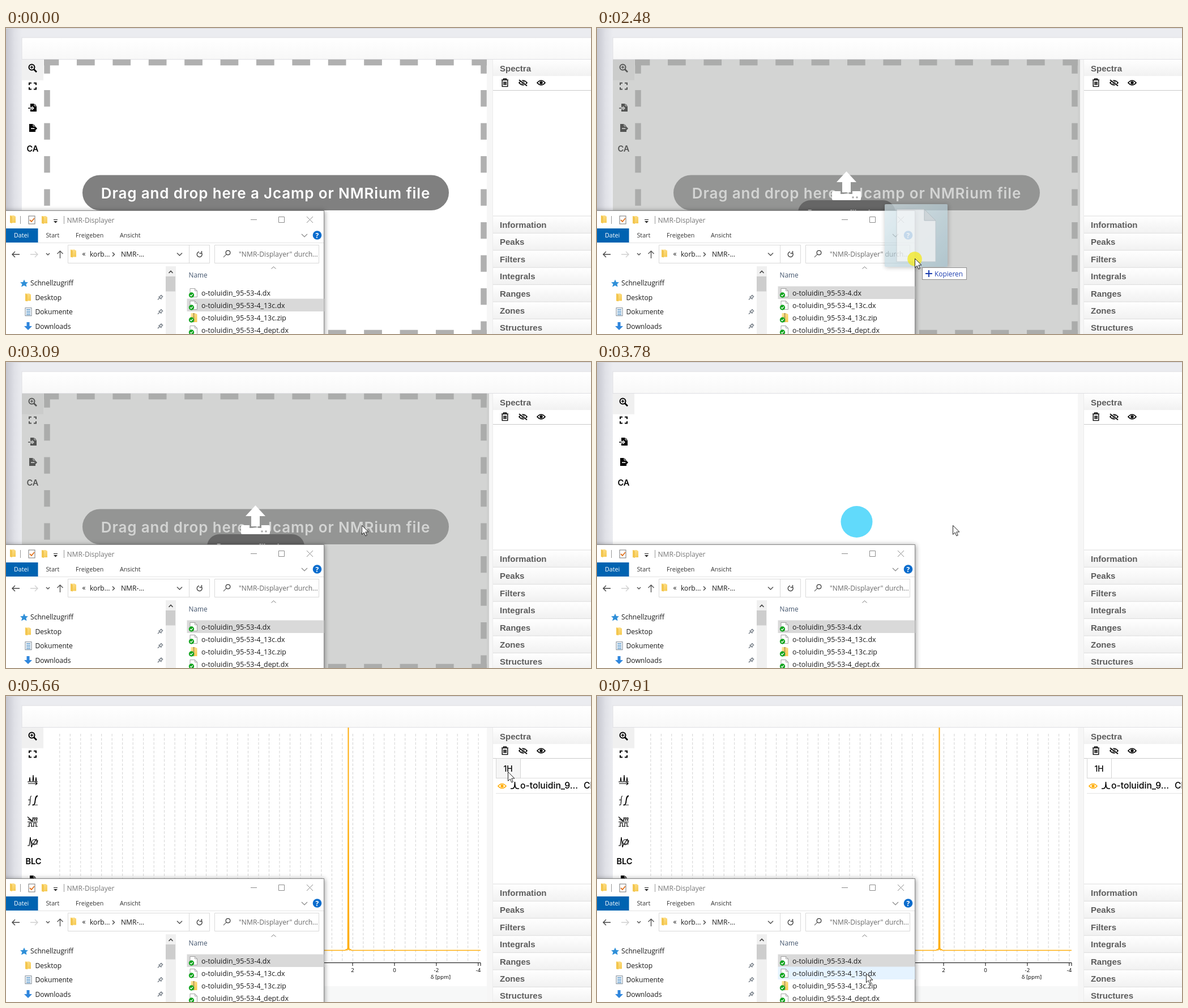
Animation of 1033 by 542 pixels, one loop 8000 ms. Source, as an HTML page:

```html
<!DOCTYPE html>
<html lang="de">
<head>
<meta charset="utf-8">
<title>Drag and drop</title>
<style>
html, body { margin: 0; width: 100%; height: 100%; overflow: hidden; background: #ebecf0; }
svg { display: block; width: 100%; height: 100%; }
.ui { font: 12.1px "Open Sans", "Noto Sans", sans-serif; }
.app { font: 600 14.6px Inter, sans-serif; }
.head { font: bold 15px "Liberation Sans", Arial, sans-serif; fill: #5c5c5c; }
.line { fill: none; stroke: currentColor; }
</style>
</head>
<body>
<svg id="stage" viewBox="0 0 1033 542" xmlns="http://www.w3.org/2000/svg"></svg>
<script>
const LOOP = 8000;
const stage = document.getElementById('stage');

const rect = (x, y, w, h, fill, extra = '') =>
  `<rect x="${x}" y="${y}" width="${w}" height="${h}" fill="${fill}" ${extra}/>`;
const text = (x, y, str, extra = '') => `<text x="${x}" y="${y}" ${extra}>${str}</text>`;
const line = (d, color, width = 1, extra = '') =>
  `<path d="${d}" fill="none" stroke="${color}" stroke-width="${width}" ${extra}/>`;
const fill = (d, color, extra = '') => `<path d="${d}" fill="${color}" ${extra}/>`;
const at = (x, y, body) => `<g transform="translate(${x} ${y})">${body}</g>`;
const group = (id, body, extra = '') => `<g id="${id}" ${extra}>${body}</g>`;
const range = (n, f) => Array.from({ length: n }, (_, i) => f(i)).join('');

const defs = `<defs>
  <linearGradient id="edge"><stop offset="0" stop-color="#c6c7cf"/><stop offset=".55" stop-color="#e0e1e7"/><stop offset="1" stop-color="#ebecf0"/></linearGradient>
  <linearGradient id="bar" x2="0" y2="1"><stop offset="0" stop-color="#fff"/><stop offset="1" stop-color="#f1f1f1"/></linearGradient>
  <linearGradient id="header" x2="0" y2="1"><stop offset="0" stop-color="#fff"/><stop offset="1" stop-color="#f8f8f8"/></linearGradient>
  <linearGradient id="glass" x2="1" y2="1"><stop offset="0" stop-color="#d5e6ec"/><stop offset="1" stop-color="#9dbdca"/></linearGradient>
  <linearGradient id="folder" x2="1" y2="1"><stop offset="0" stop-color="#ffe59b"/><stop offset="1" stop-color="#f5c84c"/></linearGradient>
  <filter id="shadow" x="-10%" y="-10%" width="120%" height="120%"><feDropShadow dx="1" dy="1" stdDeviation="4" flood-opacity=".4"/></filter>
  <clipPath id="plotClip"><rect x="67" y="56" width="782" height="458"/></clipPath>
</defs>`;

// Web application
const eye = (color, slashed) =>
  line('M-7 0Q0 -8 7 0Q0 8 -7 0Z', color, 1.7) + `<circle r="2.7" fill="${color}"/>` +
  (slashed ? line('M-7 -6L7 6', '#fff', 3.5) + line('M-7 -5L7 5.5', color, 1.6) : '');

const trash = line('M-6 -5H6M-2.5 -5V-7H2.5V-5M-4.8 -4V6.6H4.8V-4M-2 -2V4M0 -2V4M2 -2V4', '#000', 1.4);

const zoomIcon = at(46, 70, `<circle r="5" cx="-.5" cy="-.5" class="line" stroke="#000" stroke-width="2"/>` +
  line('M3 3L8 8', '#000', 2.6) + line('M-3 -.5H2M-.5 -3V2', '#000', 1.4));
const expandIcon = at(47, 103, line('M-6 -2V-5.5H-2M2 -5.5H6V-2M6 2V5.5H2M-2 5.5H-6V2', '#000', 2));
const page = fill('M-4 -7H3L7 -3V7H-4Z', '#000') + line('M3 -7V-3H7', '#fff', .9);
const importIcon = at(47, 141, page + line('M-8 1H0', '#fff', 4) + line('M-8 1H2M-1 -2L2 1L-1 4', '#000', 1.5) +
  line('M-4 1H2M-1 -2L2 1L-1 4', '#fff', 1.2));
const exportIcon = at(45, 177, page + line('M-1 1H7', '#fff', 1.6) + line('M5 1H9M6 -2L9 1L6 4', '#000', 1.6));

const accordion = ['Information', 'Peaks', 'Filters', 'Integrals', 'Ranges', 'Zones', 'Structures'];
const frame =
  rect(0, 0, 1033, 542, '#ebecf0') + rect(0, 0, 28, 542, 'url(#edge)') + rect(0, 0, 1033, 1, '#d3d4da') +
  rect(28, 17, 1010, 38.5, 'url(#header)', 'stroke="#dfdfe3"') +
  rect(28, 56, 821, 486, '#fff') + rect(849, 56, 10, 486, '#f6f6f6') +
  rect(859, 56, 174, 486, '#fff') + line('M859.5 56V542', '#ececec') +
  rect(860, 56, 173, 29, 'url(#bar)') + text(872, 76.5, 'Spectra', 'class="head"') +
  at(881, 97, trash) + at(913, 97, eye('#000', true)) + at(945, 97, eye('#000')) +
  line('M860 110.5H1033', '#c9c9c9') +
  accordion.map((name, i) => {
    const y = 333 + i * 30.4;
    return rect(860, y, 173, 30.4, 'url(#bar)') + line(`M860 ${y}H1033`, '#dcdcdc') +
      text(872, y + 21, name, 'class="head"');
  }).join('') +
  rect(28, 56, 38, 36.5, '#f0f0f0') + zoomIcon + expandIcon;

const loadTools = group('loadTools', importIcon + exportIcon +
  text(47, 218.5, 'CA', 'class="app" text-anchor="middle"'));

const dropZone = group('dropZone',
  ['M67 61H849', 'M67 540H849'].map(d =>
    line(d, '#b0b0b0', 10.5, 'stroke-dasharray="31.7" stroke-dashoffset="5.4"')).join('') +
  ['M72.5 56V545', 'M843.5 56V545'].map(d =>
    line(d, '#b0b0b0', 10.5, 'stroke-dasharray="29.25" stroke-dashoffset="4.5"')).join('') +
  rect(135, 260.5, 647, 62.5, '#808080', 'rx="31.2"') +
  text(458.5, 301.5, 'Drag and drop here a Jcamp or NMRium file',
    'class="app" fill="#fff" text-anchor="middle" style="font-size:26px;letter-spacing:.033em"'));

const overlay = group('overlay',
  rect(28, 56, 825, 486, '#a7a9a8', 'opacity=".5"') +
  rect(355, 305, 172, 44, '#666', 'rx="22"') +
  text(441, 333, 'Drop your files here', 'class="app" fill="#fff" text-anchor="middle"') +
  fill('M440.5 254L458 273H448V291H433V273H423Z', '#fff') +
  fill('M417 289H430V294H451V289H464Q466 289 466 291V303Q466 305 464 305H417Q415 305 415 303V291Q415 289 417 289Z', '#fff') +
  '<circle cx="452" cy="300" r="1.8" fill="#aaa"/><circle cx="459" cy="300" r="1.8" fill="#aaa"/>');

const loader = group('loader', '<circle cx="458.5" cy="283" r="28" fill="#61dafb"/>');

// Spectrum
const PPM = 36.97, ZERO = 686;
const sheet = group('sheet', rect(28, 514, 821, 28, '#f7f8f8') + line('M94 472.5H838V478', '#000') +
  text(767.5, 501, 'δ [ppm]', 'class="ui" style="font-size:9.7px" text-anchor="middle"'));

const tools =
  at(47, 149, line('M-9 3H-6L-5 -5L-4 3H0L1 -9L2 3H5L6 -5L7 3H9M-8 6H8M5 3.5L8 6L5 8.5', '#000', 1.2)) +
  at(47, 185, line('M-8 8H-6C-3 8 -6 -8 -2 -8M-8 -1H-4', '#000', 1.2) +
    line('M0 8C7 9 2 -8 9 -8', '#000', 1.8) + line('M-1 8H9', '#000', .8)) +
  at(47, 222, line('M-9 -8L-1 -1M-8 -4L0 0M-9 1H9M-6 9V3H-2V9M2 9V3H6V9M-9 9H-5M-3 9H3M5 9H9', '#000', 1.2) +
    text(-1, -1, 'm', 'font-family="Liberation Serif, serif" font-size="13" font-style="italic" font-weight="bold"')) +
  at(47, 259, line('M-9 6H-6L-4 -9L-2 9L0 3H9M1 3L7 -6', '#000', 1.2) +
    '<circle cx="3" cy="0" r="4.5" class="line" stroke="#000" stroke-width="1.2"/>' + line('M5 -5L9 -3L8 1', '#000', 1.2)) +
  text(48.5, 298, 'BLC', 'class="app" text-anchor="middle"') + at(46, 325, page);

const wobble = 'M95 450.5H599L600.5 449L602 450L603.5 446L604.5 220L605.5 446L607 450L608.5 449L610 450.5H681L682 449.7L683 450.5H838';
const spectrum = group('spectrum',
  range(41, i => line(`M${(94.8 + i * PPM / 2).toFixed(1)} 67V471`, '#d2d2d2', 1, 'stroke-dasharray="4.5 3"')) +
  [2, 0, -2, -4].map(v => line(`M${ZERO - v * PPM} 472V478`, '#000') +
    text(ZERO - v * PPM, 488.5, v, 'class="ui" style="font-size:9.7px" text-anchor="middle"')).join('') +
  line(wobble, '#ffae0d', 1.7) + line('M604.5 56V450', '#ffae0d', 2) +
  tools +
  '<rect id="tab" x="865.5" y="110.5" width="43" height="35" stroke="#d4d4d4"/>' +
  line('M909 145.5H1033', '#dedede') +
  text(886.5, 134, '1H', 'class="app" text-anchor="middle" style="font-size:14px;font-weight:500"') +
  at(876, 159.5, eye('#ffae0d')) +
  line('M891 164H894C898 164 898 160 898.5 152C899 160 899 164 903 164H906', '#000', 1.5) +
  text(908, 163.5, 'o-toluidin_9...', 'class="app" style="font-size:15.7px;font-weight:500"') +
  text(1020, 163.5, 'Cl', 'class="app" style="font-size:15.7px;font-weight:500"') +
  line('M865 172.5H1033', '#e4e4e4'));

const crosshair = group('crosshair',
  line('M67 0H849', '#222', 1, 'id="crossH"') + line('M0 56V514', '#222', 1, 'id="crossV"') +
  '<text id="ppm" class="app" style="font-size:15px;font-weight:500"></text>', 'clip-path="url(#plotClip)"');

// File explorer
const ROW_TOP = 458, ROW_H = 22;
const folder = fill('M-5 -7H2L5 -5V6H-5Z', 'url(#folder)') + fill('M-5 -7L-1 -5V7L-5 6Z', '#f3c64f');
const check = '<circle cx="-3" cy="4" r="4.7" fill="#12a41f"/>' + line('M-5.3 4L-3.6 5.8L-.6 2.4', '#fff', 1.3);
const docIcon = fill('M-5.5 -7.5H3L7 -3.5V7.5H-5.5Z', '#fff', 'stroke="#8d8d8d" stroke-width=".8"') +
  line('M3 -7.5V-3.5H7', '#8d8d8d', .8);
const zipIcon = fill('M-4 -8H3L7 -6V8H-4Z', 'url(#folder)') + line('M1 -8V8', '#8a7442', 2, 'stroke-dasharray="1.5 1"');
const pin = line('M-4 4L-1 1M-2.5 -1.5L2.5 3M-1.5 -.5L2 -4L4.5 -1.5L1 2', '#808890', 1.6);

const files = ['o-toluidin_95-53-4.dx', 'o-toluidin_95-53-4_13c.dx', 'o-toluidin_95-53-4_13c.zip', 'o-toluidin_95-53-4_dept.dx'];
const fileRow = (name, i) => {
  const y = ROW_TOP + i * ROW_H;
  return rect(319.5, y - .5, 242, ROW_H + .5, 'none', `id="row${i}"`) +
    at(330.5, y + 11, (name.endsWith('zip') ? zipIcon : docIcon) + check) +
    text(345, y + 16, name, 'style="font-size:12.4px"');
};

const star = fill('M0 -6.5L2 -2L7 -1.5L3.5 1.5L4.5 6.5L0 4L-5 6.5L-3.5 1.5L-7 -1.5L-2 -2Z', '#2f8fd8');
const places = [
  ['Desktop', folder],
  ['Dokumente', rect(-5, -7, 11, 14, '#fff', 'stroke="#7b8794"') + line('M-3 -4H4M-3 -1H4M-3 2H4M-3 5H4', '#3c84c0', 1.3)],
  ['Downloads', fill('M-2.5 -7H2.5V0H7L0 7L-7 0H-2.5Z', '#2f86dd')]
];

const explorer = `<g class="ui" fill="#1a1a1a">` +
  rect(-10, 323.5, 571.5, 230, '#fff', 'stroke="#858585" filter="url(#shadow)"') +
  at(12, 339, folder) + line('M25.5 333V347', '#999') +
  at(45, 340, rect(-5, -7, 11, 14, '#fff', 'stroke="#777"') + line('M-3 0L0 3L5 -3', '#e0701c', 1.8)) +
  at(68, 340, folder) + line('M84 339.5H91', '#222') + fill('M84 342H91L87.5 345.5Z', '#222') +
  line('M102.5 333V347', '#999') + text(107.5, 344.5, 'NMR-Displayer', 'fill="#777"') +
  line('M432 339.5H443M481.5 334.5H491.5V344.5H481.5ZM531 334L542 345M542 334L531 345', '#8b8b8b') +
  rect(0, 355, 56.5, 25, '#0063b1') +
  `<g style="font-size:10.7px" fill="#333">` + text(14, 371, 'Datei', 'fill="#fff"') + text(70.5, 371, 'Start') +
  text(123, 371, 'Freigeben') + text(201, 371, 'Ansicht') + '</g>' +
  line('M522 365L527 370L532 365', '#888', 1.2) + '<circle cx="549.5" cy="367" r="7.8" fill="#0a6ccd"/>' +
  text(549.5, 371.5, '?', 'fill="#fff" font-weight="bold" text-anchor="middle"') +
  line('M56 380.5H561', '#e3e3e3') +
  line('M24 401H11M16 396L11 401L16 406', '#444', 1.4) + line('M43 401H56M51 396L56 401L51 406', '#d0d0d0', 1.4) +
  line('M71 399L74 402L77 399', '#555', 1.5) + line('M95.5 408V395M90.5 400L95.5 395L100.5 400', '#555', 1.4) +
  line('M109.5 384.5H359.5V416.5H109.5ZM323.5 384.5V416.5M368.5 384.5H552.5V416.5H368.5Z', '#d9d9d9') +
  at(119, 399.5, folder) + text(134.5, 404, '«') + text(148, 405, 'korb...') +
  line('M188 397.5L191.5 401L188 404.5', '#444', 1.4) + text(203, 405, 'NMR-...') +
  line('M302 398.5L306.5 403L311 398.5', '#555', 1.5) +
  line('M345.5 398.5A4.5 4.5 0 1 1 341 396.5M345.5 395V399H341.5', '#444', 1.4) +
  `<circle cx="392" cy="398" r="4" class="line" stroke="#777"/>` + line('M389 401L384 406', '#777', 1.3) +
  text(411, 405, '"NMR-Displayer" durch...', 'fill="#6b6b6b"') +
  at(32, 452, star) + text(43, 456, 'Schnellzugriff') +
  places.map(([name, icon], i) => at(39, 477.3 + i * 25.4, icon + text(12.5, 4.5, name) + at(233, 0, pin))).join('') +
  rect(282, 422, 18, 120, '#f0f0f0') + rect(282, 440, 17, 26.5, '#cdcdcd') + line('M287.5 434L291 430.5L294.5 434', '#444', 1.6) +
  line('M468.5 426.5L472.5 422.8L476.5 426.5', '#777') + text(322.5, 441.5, 'Name', 'fill="#44566e" style="font-size:11.8px"') +
  files.map(fileRow).join('') + '</g>';

// Pointer and dragged file, drawn relative to the pointer tip
const pointer = group('pointer',
  group('ghost', rect(-53, -96, 111, 111, 'url(#glass)', 'opacity=".75" rx="2" filter="url(#shadow)"') +
    fill('M-32 -87H17L37 -67V6H-32Z', '#edf1f3', 'stroke="#bac5cb" opacity=".92"') +
    fill('M17 -87V-67H37Z', '#ccd5da', 'stroke="#aebbc2"')) +
  '<circle id="press" cy="1" r="12.8" fill="#f3e81c" opacity=".75"/>' +
  group('tip', rect(13.5, 16.5, 78, 21, '#fff', 'stroke="#8f8f8f"') + line('M19 27H31M25 21V33', '#1d3fb0', 2) +
    text(35, 31.5, 'Kopieren', 'class="ui" style="font-size:11.9px" fill="#1d3fb0"')) +
  fill('M.5 .5V16.5L4.2 13L6.8 19L9.3 18L6.8 12H12Z', '#fff', 'stroke="#222" stroke-width="1"'));

stage.innerHTML = defs + frame + loadTools + dropZone + loader + sheet + spectrum + crosshair + overlay + explorer + pointer;
const el = {};
stage.querySelectorAll('[id]').forEach(node => { el[node.id] = node; });

// Each move runs in equal steps through keys of [step, x, y]
const moves = [
  { from: 530, to: 1070, steps: 8, keys: [[0, 790, 514], [2, 600, 497], [4, 470, 482], [6, 412, 472], [7, 404, 470]] },
  { from: 2170, to: 2940, steps: 11, keys: [[0, 412, 468], [2, 475, 446], [5, 604, 389], [8, 630, 305], [10, 628, 289]] },
  { from: 5020, to: 5660, steps: 9, keys: [[0, 634, 286], [2, 690, 255], [5, 820, 177], [7, 881, 138], [8, 886, 134]] },
  { from: 6500, to: 7270, steps: 11, keys: [[0, 880, 139], [2, 828, 188], [6, 677, 334], [8, 560, 432], [10, 480, 493]] },
  { from: 7340, to: 7490, steps: 3, keys: [[0, 478, 498], [2, 476, 504]] },
  { from: 7660, to: 7910, steps: 4, keys: [[0, 476, 501], [3, 475, 491]] }
];

function pointerAt(t, lag = 0) {
  const move = moves.filter(m => t >= m.from).pop();
  if (!move) return null;
  const last = move.steps - 1;
  const step = Math.floor((t - move.from) / (move.to - move.from) * last + 0.1);
  const s = Math.max(0, Math.min(last, step) - lag);
  const i = Math.max(1, move.keys.findIndex(k => k[0] >= s));
  const [a, b] = [move.keys[i - 1], move.keys[i]];
  const u = (s - a[0]) / (b[0] - a[0]);
  return { x: a[1] + (b[1] - a[1]) * u, y: a[2] + (b[2] - a[2]) * u, moving: t < move.to + 60 };
}

const within = (t, a, b) => t >= a && t < b;
const show = (node, on) => node.setAttribute('display', on ? 'inline' : 'none');

function paintRows(t) {
  const selected = t < 1940 ? 0 + 1 : 0;
  const focused = within(t, 1940, 2470);
  const p = pointerAt(t - 70);
  const hovered = p && p.x > 319 && p.x < 561 ? Math.floor((p.y - ROW_TOP) / ROW_H) : -1;
  files.forEach((_, i) => {
    const row = el['row' + i];
    const color = i === selected ? (focused ? '#cce8ff' : '#d9d9d9') : i === hovered ? '#e5f3ff' : 'none';
    row.setAttribute('fill', color);
    row.setAttribute('stroke', focused && i === selected ? '#99d1ff' : 'none');
  });
}

function paintCrosshair(t) {
  const p = pointerAt(t, 0.35);
  const overExplorer = p && p.x < 562 && p.y > 323;
  const on = t >= 5020 && p.x < 849 && !overExplorer;
  show(el.crosshair, on);
  if (!on) return;
  const x = Math.round(p.x), y = Math.round(p.y);
  el.crossH.setAttribute('transform', `translate(0 ${y + .5})`);
  el.crossV.setAttribute('transform', `translate(${x + .5} 0)`);
  el.ppm.setAttribute('x', x - 32);
  el.ppm.setAttribute('y', y - 4);
  el.ppm.textContent = ((ZERO - x) / PPM).toFixed(2);
}

function render(t) {
  show(el.dropZone, t < 3780);
  show(el.overlay, within(t, 2470, 3780));
  show(el.loader, within(t, 3780, 4010));
  show(el.sheet, t >= 4010);
  show(el.loadTools, t < 4240);
  show(el.spectrum, t >= 4240);
  el.tab.setAttribute('fill', within(t, 5640, 6570) ? '#f6f6f6' : '#fff');

  const p = pointerAt(t);
  show(el.pointer, p);
  if (p) el.pointer.setAttribute('transform', `translate(${p.x.toFixed(1)} ${p.y.toFixed(1)})`);
  show(el.press, within(t, 1940, 3010));
  show(el.ghost, within(t, 2170, 3090));
  el.ghost.setAttribute('opacity', t < 3010 ? 0.85 : 0.4);
  show(el.tip, within(t, 2470, 3010));

  paintRows(t);
  paintCrosshair(t);
}

function tick() {
  render(performance.now() % LOOP);
  requestAnimationFrame(tick);
}
tick();
</script>
</body>
</html>
```
